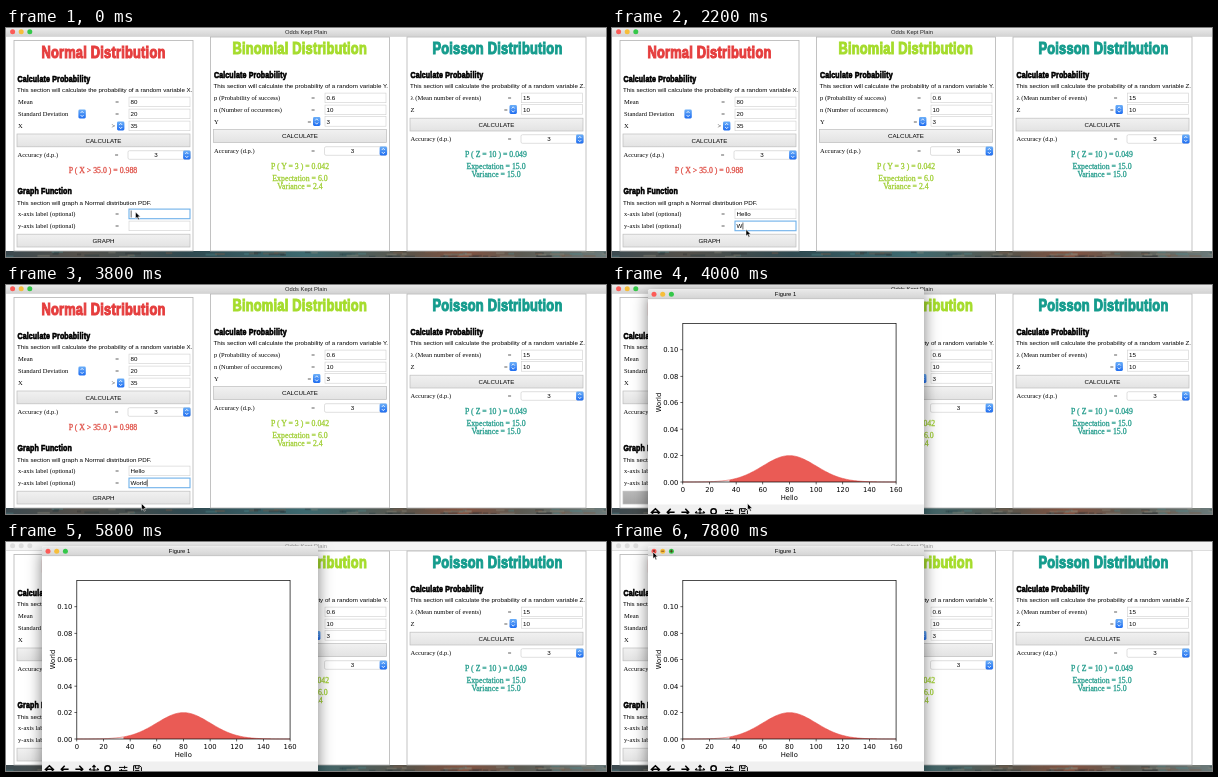
Animation, 600 px wide and 229 px high, one loop 8 s. Source, as an HTML page:

```html
<!DOCTYPE html>
<html lang="en">
<head>
<meta charset="utf-8">
<title>Distributions</title>
<style>
html, body { margin: 0; width: 100%; height: 100%; overflow: hidden; background: #fff; }
svg { display: block; width: 100vw; height: 100vh; }
text { white-space: pre; }
.ui { font: 6.2px "Liberation Sans", Arial, sans-serif; }
.label { font: 6.5px "Liberation Serif", "Times New Roman", serif; }
.result { font: 7.8px "Liberation Serif", "Times New Roman", serif; stroke-width: .28; }
.head { font: bold 16.8px "Liberation Sans", Arial, sans-serif; stroke-width: 1.15; letter-spacing: .3px; }
.sub { font: bold 9.2px "Liberation Sans", Arial, sans-serif; stroke-width: .7; letter-spacing: .2px; }
.plot { font: 6.8px "DejaVu Sans", sans-serif; }
</style>
</head>
<body>
<svg id="stage" viewBox="0 0 600 229" preserveAspectRatio="none">
  <defs>
    <linearGradient id="bar" x2="0" y2="1"><stop stop-color="#eaeaea"/><stop offset="1" stop-color="#d3d3d3"/></linearGradient>
    <linearGradient id="btn" x2="0" y2="1"><stop stop-color="#f1f1f1"/><stop offset="1" stop-color="#e3e3e3"/></linearGradient>
    <linearGradient id="pressed" x2="0" y2="1"><stop stop-color="#b9b9b9"/><stop offset="1" stop-color="#a6a6a6"/></linearGradient>
    <linearGradient id="blue" x2="0" y2="1"><stop stop-color="#6aaef8"/><stop offset="1" stop-color="#1f6df0"/></linearGradient>
    <linearGradient id="desk">
      <stop stop-color="#3c4a50"/><stop offset=".12" stop-color="#54504a"/><stop offset=".3" stop-color="#2f4950"/>
      <stop offset=".5" stop-color="#3d6a70"/><stop offset=".68" stop-color="#5d5348"/><stop offset=".76" stop-color="#84513f"/>
      <stop offset=".86" stop-color="#5b5a52"/><stop offset="1" stop-color="#6b7a7a"/>
    </linearGradient>
    <filter id="shadow" x="-20%" y="-20%" width="140%" height="140%">
      <feDropShadow dx="0" dy="5" stdDeviation="7.5" flood-opacity=".5"/>
    </filter>
  </defs>
</svg>
<script>
const LOOP = 8000, STEP = 200;
const stage = document.getElementById("stage");

function el(parent, tag, attrs, content) {
  const node = document.createElementNS("http://www.w3.org/2000/svg", tag);
  for (const key in attrs) node.setAttribute(key, attrs[key]);
  if (content !== undefined) node.textContent = content;
  parent.appendChild(node);
  return node;
}
const rect = (p, x, y, width, height, fill, more) => el(p, "rect", { x, y, width, height, fill, ...more });
const text = (p, x, y, cls, str, more) => el(p, "text", { x, y, class: cls, ...more }, str);
const path = (p, d, more) => el(p, "path", { d, fill: "none", ...more });
const dot = (p, cx, cy, r, fill) => el(p, "circle", { cx, cy, r, fill });
const middle = { "text-anchor": "middle" };
const show = (node, on) => node.setAttribute("visibility", on ? "visible" : "hidden");

// Form parts
function heading(p, x, y, cls, str, color = "#000") {
  text(p, 0, 0, cls, str, { transform: `translate(${x} ${y}) scale(.765 1)`, fill: color, stroke: color });
}
function field(p, x, cy, value = "") {
  const box = rect(p, x, cy - 4.9, 61, 9.6, "#fff", { stroke: "#cfcfcf", "stroke-width": .6 });
  return { box, label: text(p, x + 1.6, cy + 2.1, "ui", value) };
}
function button(p, x, cy, str) {
  const face = rect(p, x, cy - 6.4, 173, 12.8, "url(#btn)", { stroke: "#bdbdbd", "stroke-width": .7 });
  text(p, x + 86.5, cy + 2.2, "ui", str, middle);
  return face;
}
function arrows(p, x, cy) {
  const mx = x + 3.7;
  rect(p, x, cy - 4.4, 7.4, 8.8, "url(#blue)", { rx: 1.4 });
  path(p, `M${mx - 1.5} ${cy - 1}l1.5-1.7 1.5 1.7M${mx - 1.5} ${cy + 1}l1.5 1.7 1.5-1.7`, { stroke: "#fff", "stroke-width": .8 });
}
function row(p, x, cy, label, value, op) {
  text(p, x, cy + 2, "label", label);
  if (op) {
    arrows(p, x + 99, cy);
    text(p, x + 93.5, cy + 2, "label", op);
  } else text(p, x + 99, cy + 2, "label", "=", middle);
  return field(p, x + 111, cy, value);
}
function accuracy(p, x, cy) {
  text(p, x, cy + 2, "label", "Accuracy (d.p.)");
  text(p, x + 99, cy + 2, "label", "=", middle);
  rect(p, x + 110.5, cy - 4.3, 62.5, 8.6, "#fff", { rx: 1.5, stroke: "#c9c9c9", "stroke-width": .6 });
  arrows(p, x + 165.6, cy);
  text(p, x + 138.5, cy + 2.1, "ui", "3", middle);
}
function panel(p, x, top, titleX, title, letter, color) {
  rect(p, x, top, 179, 223 - top, "#fff", { stroke: "#b4b4b4", "stroke-width": .8 });
  heading(p, titleX, top + 17.1, "head", title + " Distribution", color);
  heading(p, x + 3.4, top + 41, "sub", "Calculate Probability");
  text(p, x + 3, top + 51.2, "ui", `This section will calculate the probability of a random variable ${letter}.`);
}
function results(p, cx, color, lines) {
  for (const [y, str] of lines) text(p, cx, y, "result", str, { ...middle, fill: color, stroke: color });
}

// Desktop strip
rect(stage, 0, 0, 600, 229, "#fff");
rect(stage, 0, 223, 600, 6, "url(#desk)");
let seed = 7;
const rnd = () => (seed = seed * 16807 % 2147483647) / 2147483647;
const tones = ["#21343b", "#4f868b", "#7d5b47", "#8d8b7d", "#2a2d30"];
for (let i = 0; i < 70; i++) {
  const x = rnd() * 600, y = 223 + rnd() * 5;
  rect(stage, x, y, 4 + rnd() * 12, Math.min(2, 229 - y), tones[Math.floor(rnd() * 5)], { opacity: .35 });
}

// Main window
const app = el(stage, "g", {});
const bar = rect(app, 0, 0, 600, 8.2, "url(#bar)");
rect(app, 0, 8, 600, .5, "#bcbcbc");
const lightColors = ["#fc5b57", "#f6be3b", "#35c84a"];
const appLights = lightColors.map((c, i) => dot(app, 6.6 + i * 8.6, 3.7, 2.5, c));
const appTitle = text(app, 300, 5.8, "ui", "Odds Kept Plain", { ...middle, style: "font-size:5.8px" });

panel(app, 8, 12.5, 35.4, "Normal", "X", "#e53d3d");
row(app, 12, 74, "Mean", "80");
row(app, 12, 86, "Standard Deviation", "20");
arrows(app, 72.4, 86);
row(app, 12, 98, "X", "35", ">");
button(app, 11, 112.4, "CALCULATE");
accuracy(app, 11.5, 127);
results(app, 97, "#df5148", [[145, "P ( X > 35.0 ) = 0.988"]]);
heading(app, 11.4, 166, "sub", "Graph Function");
text(app, 11, 177, "ui", "This section will graph a Normal distribution PDF.");
const xField = row(app, 12, 186, "x-axis label (optional)");
const yField = row(app, 12, 198, "y-axis label (optional)");
const graphButton = button(app, 11, 212.6, "GRAPH");
const caret = rect(app, 0, 0, .6, 7, "#000");

panel(app, 204.5, 9, 226.4, "Binomial", "Y", "#a5dc2c");
row(app, 208, 70, "p (Probability of success)", "0.6");
row(app, 208, 82, "n (Number of occurences)", "10");
row(app, 208, 93.5, "Y", "3", "=");
button(app, 207.5, 108, "CALCULATE");
accuracy(app, 208, 123);
results(app, 294, "#9fce32", [[140.7, "P ( Y = 3 ) = 0.042"], [152.6, "Expectation = 6.0"], [161, "Variance = 2.4"]]);

panel(app, 401, 9, 426.4, "Poisson", "Z", "#159c8d");
row(app, 404.5, 70, "λ (Mean number of events)", "15");
row(app, 404.5, 81.5, "Z", "10", "=");
button(app, 404, 96.6, "CALCULATE");
accuracy(app, 404.5, 111);
results(app, 490, "#249c8c", [[128.8, "P ( Z = 10 ) = 0.049"], [140.6, "Expectation = 15.0"], [149, "Variance = 15.0"]]);

// Figure window
const figure = el(stage, "g", {});
rect(figure, 36, 4.2, 276, 240, "#fff", { rx: 2.5, filter: "url(#shadow)" });
path(figure, "M36 14V6.7q0-2.5 2.5-2.5H309.5q2.5 0 2.5 2.5V14z", { style: "fill:url(#bar)" });
rect(figure, 36, 13.6, 276, .5, "#b5b5b5");
rect(figure, 36, 219.5, 276, 10, "#f0f0f0");
text(figure, 173.5, 11.2, "ui", "Figure 1", { ...middle, style: "font-size:5.8px" });
lightColors.forEach((c, i) => dot(figure, 42 + i * 8.7, 9.2, 2.5, c));
const marks = path(figure, "M40.8 8l2.4 2.4m0-2.4l-2.4 2.4M49.2 9.2h3M57.9 9.2h3m-1.5-1.5v3",
  { stroke: "#5a1a10", "stroke-width": .7 });

const px = v => 70.8 + v * 1.333, py = v => 197 - v * 1322;
const pdf = v => Math.exp(-(((v - 80) / 20) ** 2) / 2) / (20 * Math.sqrt(2 * Math.PI));
function curve(from) {
  let d = "";
  for (let v = from; v <= 160; v++) d += `${d ? "L" : "M"}${px(v).toFixed(2)} ${py(pdf(v)).toFixed(2)}`;
  return d;
}
path(figure, `${curve(35)}V197H${px(35)}z`, { style: "fill:#ea5b55" });
path(figure, curve(0), { stroke: "#e5504a", "stroke-width": .6 });
rect(figure, px(0), 38.5, px(160) - px(0), 158.5, "none", { stroke: "#000", "stroke-width": .7 });
for (let v = 0; v <= 160; v += 20) {
  rect(figure, px(v) - .3, 197, .6, 2.4, "#000");
  text(figure, px(v), 206.6, "plot", v, middle);
}
for (let i = 0; i <= 5; i++) {
  const y = py(i * .02);
  rect(figure, 68.4, y - .3, 2.4, .6, "#000");
  text(figure, 66.3, y + 2.5, "plot", (i * .02).toFixed(2), { "text-anchor": "end" });
}
text(figure, 177.3, 214.8, "plot", "Hello", middle);
text(figure, 0, 0, "plot", "World", { ...middle, transform: "translate(49.3 117.5) rotate(-90)" });

// Toolbar icons, cut by the stage edge
const ink = { stroke: "#000", "stroke-width": 1.5 };
path(figure, "M38.8 228l4.6-4.2 4.6 4.2M40.6 229v-1.8h5.8v1.8", ink);
path(figure, "M58.7 223.8l-3.4 3.5 3.4 3.5M55.6 227.3h7", ink);
path(figure, "M73.3 223.8l3.4 3.5-3.4 3.5M76.4 227.3h-7", ink);
path(figure, "M88 224v8M83.6 228h8.8M86.4 225.2l1.6-1.7 1.6 1.7M84.8 226.4l-1.6 1.6M91.2 226.4l1.6 1.6", { ...ink, "stroke-width": 1.2 });
el(figure, "circle", { cx: 101.6, cy: 226.4, r: 2.7, fill: "none", ...ink });
path(figure, "M113 225.4h8.4M113 228.4h8.4M118.6 223.8v3M115.4 227v3", { ...ink, "stroke-width": 1 });
path(figure, "M127.6 231v-7.3h6.2l1.6 1.6v6M129.4 223.7v2.6h3.6v-2.6M129.4 230v-1.6h4", { ...ink, "stroke-width": 1 });

const pointer = path(stage, "M0 0V6.6L1.6 5.2 2.7 7.7 3.8 7.2 2.7 4.8H4.8Z",
  { style: "fill:#000", stroke: "#fff", "stroke-width": .5 });

// Pointer stops: time, x, y
const stops = [
  [0, 129.5, 184], [1200, 129.5, 184], [1800, 134, 201.5], [3000, 134, 201.5], [3600, 135.5, 218.5],
  [4200, 135.5, 218.5], [4800, 135, 234], [6000, 128, 234], [7200, 41, 10], [8000, 41, 10]
];
function pointerAt(t) {
  const i = stops.findIndex((s, k) => k > 0 && t < s[0]);
  const [t0, x0, y0] = stops[i - 1], [t1, x1, y1] = stops[i];
  const u = (t - t0) / (t1 - t0), e = u * u * (3 - 2 * u);
  return [x0 + (x1 - x0) * e, y0 + (y1 - y0) * e];
}
const typed = (str, t, start) => str.slice(0, Math.max(0, Math.floor((t - start) / STEP) + 1));

function render(time) {
  const t = Math.floor((time % LOOP) / STEP) * STEP;
  // The main window loses focus one step after the figure opens
  const open = t >= 4000, blurred = t >= 4200, second = t >= 1800;
  xField.label.textContent = typed("Hello", t, 400);
  yField.label.textContent = typed("World", t, 2200);
  [xField, yField].forEach((f, i) => {
    const focus = !blurred && second === (i === 1);
    f.box.setAttribute("stroke", focus ? "#6fb1ea" : "#cfcfcf");
    f.box.setAttribute("stroke-width", focus ? 1.1 : .6);
  });
  const active = second ? yField : xField;
  const width = active.label.textContent ? active.label.getComputedTextLength() : 0;
  caret.setAttribute("x", 124.8 + width);
  caret.setAttribute("y", second ? 194.5 : 182.5);
  show(caret, !open);
  show(figure, open);
  show(marks, t >= 7200);
  graphButton.setAttribute("fill", open && !blurred ? "url(#pressed)" : "url(#btn)");
  bar.setAttribute("fill", blurred ? "#f5f5f5" : "url(#bar)");
  appTitle.setAttribute("fill", blurred ? "#999" : "#222");
  appLights.forEach((c, i) => c.setAttribute("fill", blurred ? "#dcdcdc" : lightColors[i]));
  pointer.setAttribute("transform", `translate(${pointerAt(t)})`);
}

const begin = performance.now();
function tick() {
  render(performance.now() - begin);
  requestAnimationFrame(tick);
}
tick();
</script>
</body>
</html>
```
